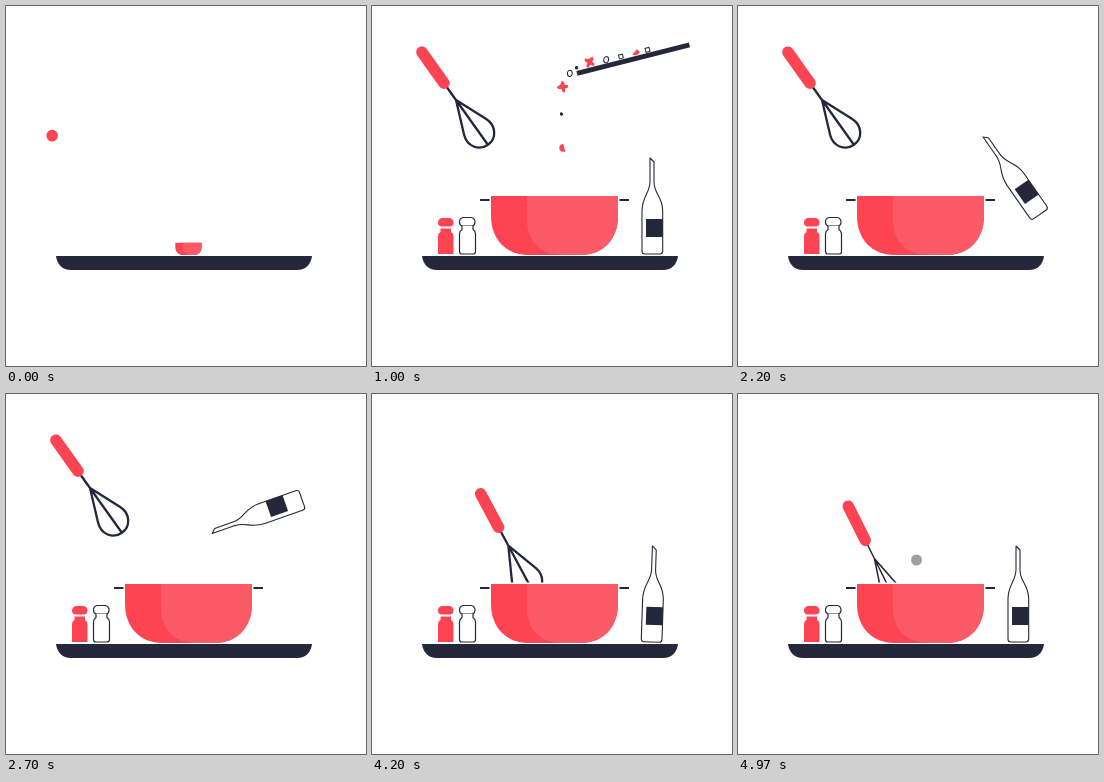
These frames come from a looping animation (360x360 px, 5.01 s). An HTML page with a canvas:

```html
<!DOCTYPE html>
<html lang="en">
<head>
<meta charset="utf-8">
<title>Cooking loop</title>
<style>
html, body { margin: 0; width: 100%; height: 100%; overflow: hidden; background: #fff; }
canvas { display: block; width: 360px; height: 360px; }
</style>
</head>
<body>
<canvas id="stage" width="360" height="360"></canvas>
<script>
const ctx = document.getElementById('stage').getContext('2d');
const LOOP = 5010;
const DARK = '#25273a', RED = '#fd4453', LIGHT = '#fb5b67', GREY = '#a0a0a0';
const RAD = Math.PI / 180;

const lerp = (a, b, k) => a + (b - a) * k;
const span = (t, a, b) => Math.min(1, Math.max(0, (t - a) / (b - a)));
const outQuad = u => 1 - (1 - u) ** 2;
const outCubic = u => 1 - (1 - u) ** 3;
const inOut = u => u < .5 ? 2 * u * u : 1 - 2 * (1 - u) ** 2;
const outBack = (u, c) => 1 + (c + 1) * (u - 1) ** 3 + c * (u - 1) ** 2;

function shape(d, fill, stroke, width = 1.2) {
  const p = new Path2D(d);
  if (fill) { ctx.fillStyle = fill; ctx.fill(p); }
  if (stroke) { ctx.strokeStyle = stroke; ctx.lineWidth = width; ctx.stroke(p); }
}

function dot(x, y, r, color) {
  ctx.fillStyle = color;
  ctx.beginPath();
  ctx.arc(x, y, r, 0, 7);
  ctx.fill();
}

function placed(x, y, angle, scale, draw) {
  ctx.save();
  ctx.translate(x, y);
  ctx.rotate(angle * RAD);
  ctx.scale(scale, scale);
  draw();
  ctx.restore();
}

function aboveLine(y, draw) {
  ctx.save();
  ctx.beginPath();
  ctx.rect(0, 0, 360, y);
  ctx.clip();
  draw();
  ctx.restore();
}

function shelf() {
  shape('M50 250H306C305 258 300 264 291 264H65C56 264 51 258 50 250Z', DARK);
}

function bowl(t) {
  placed(182.5, 249, 0, lerp(.2, 1, outBack(span(t, 0, 430), 1.2)), () => {
    ctx.translate(-182.5, -249);
    shape('M119 190H246V210C246 233 231 249 209 249H156C134 249 119 233 119 210Z', RED);
    shape('M155 190H246V210C246 233 231 249 209 249H190C168 249 155 235 155 214Z', LIGHT);
  });
  if (t < 400) return;
  const k = 1 - outQuad(span(t, 400, 640));
  ctx.lineCap = 'butt';
  shape(`M${108 + 11 * k} 194h9.5M${247.5 - 7 * k} 194h9.5`, null, DARK, 2);
}

function shakers(t) {
  const cap = 'M3.5 0H12Q15.5 1 15.5 4.5T12.5 8.5H3Q0 8 0 4.5T3.5 0Z';
  const body = 'M2.5 10.5H13V14Q15.5 15 15.5 18V36H0V18Q0 15 2.5 14Z';
  const rise = (a, b) => 40 * (1 - outBack(span(t, a, b), 3.7));
  aboveLine(250, () => {
    if (t > 200) placed(66, 212 + rise(200, 600), 0, 1, () => {
      shape(cap, RED);
      shape(body, RED);
    });
    if (t > 60) placed(87.5, 211.5 + rise(60, 440), 0, 1, () => {
      shape(cap, '#fff', DARK);
      shape('M2.5 8.5V12Q0 13.5 0 16.5V34Q0 36.5 2.5 36.5H13.5Q16 36.5 16 34V16.5Q16 13.5 13.5 12V8.5', '#fff', DARK);
    });
  });
}

// Turns about a point in the lower half of the body.
function bottle(t) {
  if (t < 40) return;
  const rise = 100 * (1 - outBack(span(t, 40, 450), 1));
  let lift = outBack(span(t, 2150, 2690), .8);
  if (t > 3680) lift = 1 - outBack(span(t, 3680, 4300), 1);
  const k = Math.min(1, Math.max(0, lift));
  const x = lerp(280.5, 273.3, k) + 12 * Math.sin(Math.PI * k);
  aboveLine(250, () => placed(x, lerp(224, 113.3, k) + rise, -109.4 * lift, 1, () => {
    ctx.translate(0, -24);
    ctx.lineJoin = 'round';
    shape('M-2.5 -48L1.5 -44V-24C1.5 -12 10 -10 10.2 5V45Q10 48 7.5 48H-8Q-10.5 48 -10.5 45V5C-10.2 -10 -3 -12 -2.5 -24Z',
      '#fff', DARK, 1.1);
    shape('M-6.5 13H10.2V31H-6.5Z', DARK);
  }));
}

function whisk(t) {
  const grow = outCubic(span(t, 0, 700));
  const moveX = outCubic(span(t, 0, 480)), moveY = outQuad(span(t, 0, 600));
  const dipX = inOut(span(t, 3750, 4220)), dip = inOut(span(t, 3750, 4400));
  const mix = span(t, 4300, 4970) * Math.PI;
  const sway = 5 * Math.sin(mix * 4);
  const wide = 1 - .35 * Math.sin(mix * 2.5) ** 2;
  const x = lerp(lerp(46, 84, moveX), 136.5, dipX) + sway;
  const y = lerp(lerp(150.7, 94, moveY), 164.8, dip);
  const angle = lerp(lerp(0, -35.5, outQuad(span(t, 0, 700))), -26.5, dip) + sway * .35;
  aboveLine(t > 3750 ? 188.5 : 360, () => placed(x, y, angle, 1, () => {
    ctx.lineJoin = 'round';
    ctx.lineCap = 'round';
    if (grow > .05) {
      ctx.save();
      ctx.translate(0, -20.7);
      ctx.scale(grow * wide, grow);
      ctx.translate(0, 20.7);
      shape('M0 -16V54M0 0L-13.6 33C-18 44 -11 55 0 55S18 44 13.6 33Z', null, DARK, 2.3);
      ctx.restore();
    }
    shape(`M0 -20.7V${-20.75 - 38 * grow}`, null, RED, 11.5);
  }));
}

// Each item: place along the board, then its kind.
const FOOD = [
  [5, 'tomato'], [12, 'bead'], [22, 'pepper'], [33, 'oval'], [39, 'bead'],
  [47, 'pepper'], [58, 'oval'], [68, 'cube'], [79, 'slice'], [87, 'cube']
];
const KINDS = {
  tomato: () => shape('M-4 0Q-4 -5 0 -5T4 0Z', RED),
  bead: () => dot(0, -3, 1.7, DARK),
  pepper: () => shape('M-4 -10L0 -8.5L4 -10L4.5 -7L2.5 -5L4.5 -2.5L3 -.5L0 -2.5L-3 0L-4.5 -2L-2.5 -5L-4.5 -7.5Z', RED),
  oval: () => {
    ctx.beginPath();
    ctx.ellipse(0, -3.5, 2.4, 3.2, .5, 0, 7);
    ctx.strokeStyle = DARK;
    ctx.lineWidth = 1;
    ctx.stroke();
  },
  cube: () => shape('M-2 -5H2V-1H-2Z', '#fff', DARK, 1),
  slice: () => shape('M-4 -2L2 -6L4 -3Q1 1 -4 -2Z', RED)
};

function board(t) {
  if (t < 60 || t > 2130) return;
  const tilt = 15 * inOut(span(t, 560, 1090)) - 5 * inOut(span(t, 1460, 1630)) - 10 * inOut(span(t, 1630, 1860));
  const size = t > 1850 ? 1 - span(t, 1850, 2130) ** 2 : Math.max(0, outBack(span(t, 60, 640), 1.57));
  const px = 205, py = 67.3, mid = 29;
  const along = s => mid + (s - mid) * size;
  placed(px, py, -tilt, 1, () => {
    ctx.lineCap = 'butt';
    shape(`M${along(0)} 0H${along(116)}`, null, DARK, 5);
  });
  if (t < 200) return;
  FOOD.forEach(([s, kind], i) => {
    const start = 650 + i * 22, pull = 1100;
    const tau = Math.max(0, t - start) / 1000;
    const edge = Math.sqrt(2 * (s + 3) / pull);
    const pop = outBack(span(t, 200 + i * 12, 400 + i * 12), 1.5);
    if (pop <= 0) return;
    if (tau < edge) {
      const d = along(s - pull * tau * tau / 2);
      placed(px, py, -tilt, 1, () => placed(d, -2.5, 0, pop, KINDS[kind]));
    } else {
      const f = tau - edge, v = pull * edge;
      const y = py + v * .26 * f + 1250 * f * f;
      if (y < 205) placed(px - 3 - v * .32 * f, y, -tilt - 400 * f, 1, KINDS[kind]);
    }
  });
}

function steam(t) {
  const k = outQuad(span(t, 4820, 4970));
  if (k > 0) dot(178.5, lerp(186, 166, k), 5.5 * k, GREY);
}

function draw(t) {
  ctx.fillStyle = '#fff';
  ctx.fillRect(0, 0, 360, 360);
  board(t);
  whisk(t);
  steam(t);
  bowl(t);
  shakers(t);
  bottle(t);
  shelf();
}

const began = performance.now();
function tick() {
  draw((performance.now() - began) % LOOP);
  requestAnimationFrame(tick);
}
draw(0);
requestAnimationFrame(tick);
</script>
</body>
</html>
```
